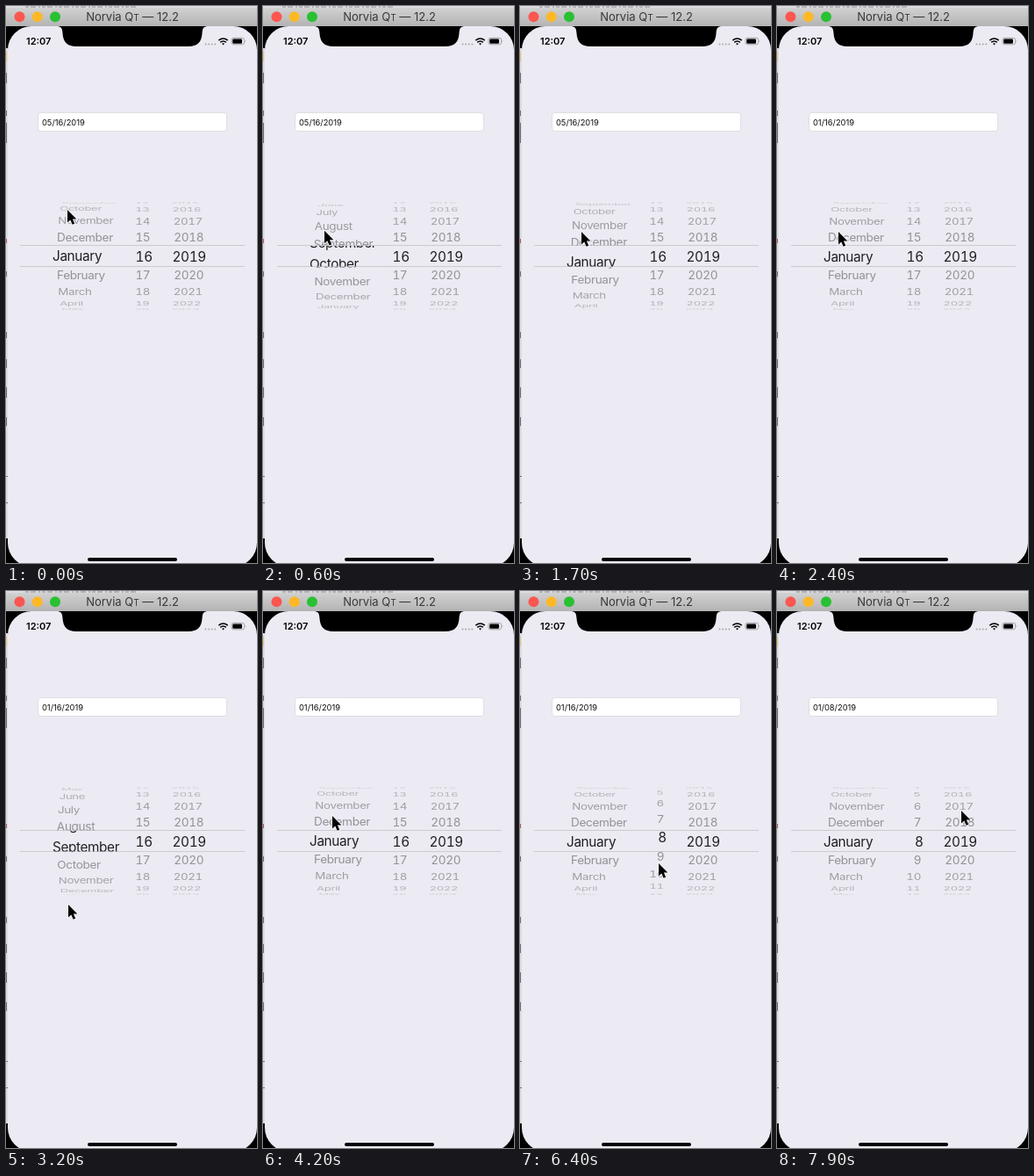
Recreate the animation shown at these times as an HTML page. Size 286x634 px, loop 8 s.

```html
<!DOCTYPE html>
<html lang="en">
<head>
<meta charset="utf-8">
<title>Date picker</title>
<style>
  html, body { margin: 0; width: 100%; height: 100%; overflow: hidden; background: #000; }
  svg { display: block; width: 286px; height: 634px; font-family: Inter, Roboto, sans-serif; }
  .wheel text { font-size: 15.3px; letter-spacing: -.35px; font-variant-numeric: tabular-nums; }
  #rows { fill: #929197; }
  #band { fill: #1f1f23; }
</style>
</head>
<body>
<svg viewBox="0 0 286 634">
  <defs>
    <linearGradient id="bar" x2="0" y2="1">
      <stop stop-color="#d2d1d2"/><stop offset="1" stop-color="#b4b3b4"/>
    </linearGradient>
    <clipPath id="outside"><path d="M16 222H272V272.5H16ZM16 297H272V348H16Z"/></clipPath>
    <clipPath id="inside"><path d="M16 273H272V296.5H16Z"/></clipPath>
  </defs>

  <!-- desktop slivers around the window -->
  <rect width="286" height="634" fill="#dddce3"/>
  <path d="M22 1H150" stroke="#8c8b90" stroke-dasharray="4 2 6 3 2 2"/>
  <path d="M.5 76V88M.5 119V125M.5 133V156M.5 302V308M.5 371V378M.5 402V412M.5 434V446M.5 468V478M0 535.5H2M0 565.5H2" stroke="#6d6c78"/>
  <path d="M.5 52V63" stroke="#e8c66a"/>
  <path d="M.5 265V270" stroke="#c8505a"/>

  <!-- window and device -->
  <path d="M0 23H286V634H0V606H2V48H0Z"/>
  <rect y="2" width="286" height="21" fill="url(#bar)"/>
  <circle cx="15.5" cy="12.3" r="6" fill="#fc5650"/>
  <circle cx="35.7" cy="12.3" r="6" fill="#fdb827"/>
  <circle cx="56" cy="12.3" r="6" fill="#29c132"/>
  <text x="144" y="17" font-size="13" text-anchor="middle" fill="#38373a">Norvia Q<tspan font-size="10">T</tspan> — 12.2</text>
  <rect x="2" y="23" width="284" height="615" rx="27" fill="#ecebf3"/>
  <path d="M57 23C63 23 64 25 64.5 31C65 41 70 46 80 46H208C218 46 223 41 223.5 31C224 25 225 23 231 23Z"/>

  <!-- status bar -->
  <text x="23" y="44" font-size="11" font-weight="600">12:07</text>
  <path d="M227.5 43.5h0m3.6 0h0m3.6 0h0m3.6 0h0" stroke="#a9a8b0" stroke-width="2" stroke-linecap="round"/>
  <g fill="none" stroke="#000" stroke-width="1.6">
    <path d="M242.3 39.2Q247.5 34.8 252.7 39.2M244.2 41.4Q247.5 38.6 250.8 41.4"/>
    <path d="M246 42.8Q247.5 41.6 249 42.8L247.5 44.4Z" stroke="none" fill="#000"/>
    <rect x="257" y="36.4" width="14.6" height="7.4" rx="2.2" stroke="#8f8e95" stroke-width=".8"/>
  </g>
  <rect x="258.2" y="37.5" width="10.8" height="5.2" rx="1.2"/>
  <path d="M272.6 38.8Q274 40.1 272.6 41.4Z" fill="#8f8e95"/>

  <!-- date field -->
  <rect x="36.5" y="121.5" width="215" height="21" rx="3.5" fill="#fff" stroke="#d8d7de" stroke-width=".8"/>
  <text id="field" x="41" y="135.5" font-size="9.3" fill="#111"></text>

  <!-- picker -->
  <path d="M16 272.5H272M16 296.5H272" stroke="#cccbd2"/>
  <g class="wheel" clip-path="url(#outside)"><g id="rows"></g></g>
  <g class="wheel" clip-path="url(#inside)"><g id="band"></g></g>

  <rect x="93" y="628" width="102" height="4" rx="2"/>
  <path id="cursor" d="M0 0V14.6L3.3 11.5L5.6 16.8L8.2 15.7L5.9 10.5H10.4Z" stroke="#fff" stroke-width="1.2" paint-order="stroke"/>
</svg>

<script>
const LOOP = 8000, MID_X = 143, MID_Y = 285.2, RADIUS = 61, STEP = 20.6 * Math.PI / 180;
const MONTHS = 'January February March April May June July August September October November December'.split(' ');
const $ = id => document.getElementById(id);
const mod = (a, n) => ((a % n) + n) % n;

// x is the edge in the outer rows, bandX the edge in the selected row
const columns = [
  { x: 57.6, bandX: 53, anchor: 'start', label: i => MONTHS[mod(i, 12)], pos: monthAt },
  { x: 164.4, bandX: 166.7, anchor: 'end', label: i => mod(i - 1, 31) + 1, pos: dayAt },
  { x: 225.6, bandX: 227.8, anchor: 'end', label: i => i, pos: () => 2019 }
];

function makeRow(layer, anchor, k) {
  const el = document.createElementNS('http://www.w3.org/2000/svg', 'text');
  el.setAttribute('text-anchor', anchor);
  el.setAttribute('y', 5.5);
  $(layer).append(el);
  return { el, k };
}
for (const c of columns) {
  c.rows = [-4, -3, -2, -1, 0, 1, 2, 3, 4].map(k => makeRow('rows', c.anchor, k));
  c.band = [-1, 0, 1].map(k => makeRow('band', c.anchor, k));
}

// exponential slow-down from a to b
function fling(t, t0, t1, a, b, tau) {
  const f = s => 1 - Math.exp(-s / tau);
  const u = Math.min(Math.max(t - t0, 0), t1 - t0);
  return a + (b - a) * f(u) / f(t1 - t0);
}

// piecewise track of [time, ...values], eased between keys
function track(keys, t) {
  let i = keys.findIndex(k => k[0] > t);
  if (i < 0) return keys[keys.length - 1].slice(1);
  if (i === 0) return keys[0].slice(1);
  const a = keys[i - 1], b = keys[i];
  const u = (t - a[0]) / (b[0] - a[0]), e = u * u * (3 - 2 * u);
  return a.slice(1).map((v, j) => v + (b[j + 1] - v) * e);
}

const cursorKeys = [
  [0, 70, 232], [700, 70, 257], [2800, 70, 257], [3200, 71, 357], [3350, 71, 357],
  [3750, 79, 256], [4200, 79, 256], [5000, 158, 257], [5750, 158, 257], [5980, 158, 310],
  [6950, 158, 310], [7300, 212, 334], [7650, 212, 334], [7900, 210, 250]
];

function monthAt(t) {
  if (t < 2800) return fling(t, 0, 2400, 0, 12, 478);
  if (t < 3200) return track([[2800, 12], [3200, 7.8]], t)[0];
  return fling(t, 3200, 4500, 7.8, 0, 200);
}

function dayAt(t) {
  if (t < 5980) return track([[5750, 16], [5980, 13.9]], t)[0];
  return fling(t, 5980, 6800, 13.9, 8, 125);
}

function place({ el }, text, x, y, sx, sy) {
  if (el.textContent !== String(text)) el.textContent = text;
  el.setAttribute('transform', `translate(${x.toFixed(2)} ${y.toFixed(2)}) scale(${sx.toFixed(3)} ${sy.toFixed(3)})`);
}

function drawColumn(c, t) {
  const pos = c.pos(t), base = Math.round(pos);
  for (const row of c.rows) {
    const a = (base + row.k - pos) * STEP, cos = Math.max(Math.cos(a), 0);
    const depth = 1 - .08 * (1 - cos);
    place(row, c.label(base + row.k), MID_X + (c.x - MID_X) * depth,
      MID_Y + RADIUS * Math.sin(a), .89 * depth, .89 * cos);
    row.el.setAttribute('opacity', cos ? Math.min(1, .25 + .8 * cos) : 0);
  }
  for (const row of c.band) {
    const a = (base + row.k - pos) * STEP;
    place(row, c.label(base + row.k), c.bandX, MID_Y + 1.12 * RADIUS * Math.sin(a), 1, Math.cos(a));
  }
}

function draw(t) {
  for (const c of columns) drawColumn(c, t);
  $('field').textContent = t < 2350 ? '05/16/2019' : t < 6980 ? '01/16/2019' : '01/08/2019';
  $('cursor').setAttribute('transform', `translate(${track(cursorKeys, t)})`);
}

const start = performance.now();
function tick() {
  draw((performance.now() - start) % LOOP);
  requestAnimationFrame(tick);
}
tick();
</script>
</body>
</html>
```
